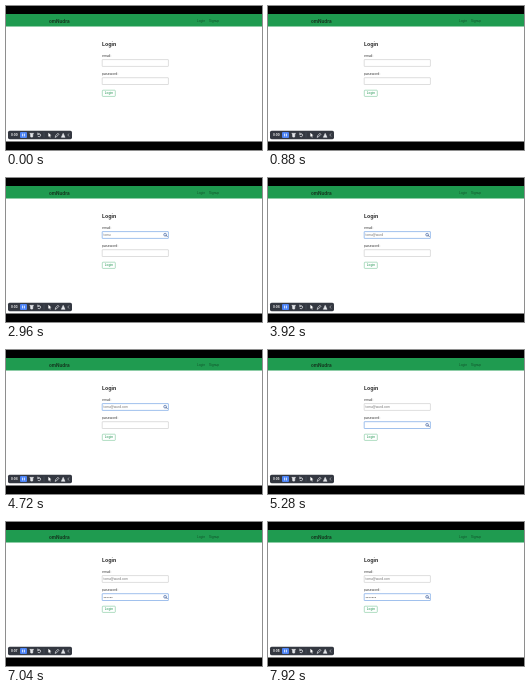
Recreate the animation shown at these times as an HTML page. Size 256 px wide and 144 px high, loop 8000 ms.

```html
<!DOCTYPE html>
<html lang="en">
<head>
<meta charset="utf-8">
<title>Login</title>
<style>
  html, body { margin: 0; width: 100%; height: 100%; overflow: hidden; background: #000; }
  svg { display: block; width: 100vw; height: 100vh; }
  text { font-family: Inter, sans-serif; font-size: 3.35px; fill: #3a3a3a; }
  .brand { font-size: 4.6px; font-weight: 700; fill: #14361f; }
  .nav { font-size: 3.1px; fill: #124f2a; }
  .title { font-size: 5.3px; font-weight: 700; fill: #2b2b2b; }
  .value { font-family: "Liberation Sans", Arial, sans-serif; font-size: 3.2px; fill: #707070; }
  .secret { font-size: 4px; letter-spacing: .15px; }
  .field rect { fill: #fff; stroke: #bdbdbd; stroke-width: .5; }
  .field .key { visibility: hidden; }
  .focus rect { stroke: #6f9fe4; stroke-width: .65; }
  .focus .key { visibility: visible; }
  .button { fill: #fff; stroke: #62ba87; stroke-width: .5; }
  .button-label { font-size: 3.1px; font-weight: 500; fill: #2b9a5a; }
  .clock { font-size: 2.8px; font-weight: 700; fill: #fff; }
  .line { fill: none; stroke: #e4e6ea; stroke-width: .7; stroke-linecap: round; stroke-linejoin: round; }
</style>
</head>
<body>
<svg viewBox="0 0 256 144" preserveAspectRatio="none">
  <defs>
    <g id="key">
      <circle cx="159.1" cy="56.7" r="1.4" fill="#dfe8f7" stroke="#5b78ad" stroke-width=".7"/>
      <path d="M159.9 57.2l1.5 1.6" stroke="#2c4270" stroke-width=".8"/>
    </g>
  </defs>

  <rect y="8" width="256" height="127.5" fill="#fff"/>
  <rect y="8" width="256" height="12.5" fill="#1f9b50"/>
  <text class="brand" x="43" y="16.7">omNudra</text>
  <text class="nav" x="191" y="16.2">Login</text>
  <text class="nav" x="203" y="16.2">Signup</text>

  <text class="title" x="96" y="40.4">Login</text>
  <text x="96" y="51">email:</text>
  <g class="field" id="email">
    <rect x="96.2" y="53.6" width="66.2" height="6.8" rx=".3"/>
    <text class="value" x="97.5" y="58.2"></text>
    <use class="key" href="#key"/>
  </g>
  <text x="96" y="69.2">password:</text>
  <g class="field" id="password">
    <rect x="96.2" y="71.7" width="66.2" height="6.8" rx=".3"/>
    <text class="value secret" x="97.5" y="76.5"></text>
    <use class="key" href="#key" y="18.1"/>
  </g>
  <rect class="button" x="96.3" y="84.2" width="13" height="6.2" rx=".7"/>
  <text class="button-label" x="98.8" y="88.4">Login</text>

  <rect x="2" y="124.8" width="64" height="8.4" rx="1.6" fill="#343841"/>
  <text class="clock" id="clock" x="5" y="130">0:00</text>
  <rect x="14" y="126" width="7" height="6" rx="1" fill="#4b82f5"/>
  <path d="M16.6 127.6v2.8M18.4 127.6v2.8" stroke="#fff" stroke-width=".8"/>
  <g class="line">
    <path d="M24 127.4h3.4M24.5 127.6l.3 3.4h1.8l.3-3.4" fill="#e4e6ea"/>
    <path d="M31.8 128.2a1.6 1.6 0 1 1 .2 2.2M31.8 127v1.4h1.3"/>
    <path d="M38 126.8v4.4" stroke="#596070" stroke-width=".4"/>
    <path d="M49.3 131l.4-1.4 2.2-2.3 1 1-2.2 2.3z"/>
    <path d="M55.6 131l1.6-3.6 1.6 3.6z" fill="#e4e6ea"/>
    <path d="M62.8 127.8l-1 1.2 1 1.2" stroke-width=".5"/>
  </g>
  <path d="M42.4 126.8l3 2.7-1.5.1.8 1.6-.8.3-.7-1.6-.9.9z" fill="#fff"/>

  <path id="pointer" d="M0 0l2 1.9-1 .1.5 1-.5.2-.4-1-.6.6z" fill="#444"/>
</svg>
<script>
  const LOOP = 8000, KEY_TIME = 160;
  const ADDRESS = "tomu@wunil.com", SECRET = "•".repeat(7);
  const find = s => document.querySelector(s);
  const clamp = (v, lo, hi) => Math.min(hi, Math.max(lo, v));
  const clock = find("#clock"), pointer = find("#pointer");

  const typed = (text, t, start, step) =>
    text.slice(0, clamp(Math.floor((t - start) / step) + 1, 0, text.length));

  function field(id) {
    const group = find(id), value = group.querySelector("text");
    return (text, focused) => {
      value.textContent = text;
      group.classList.toggle("focus", focused);
    };
  }
  const email = field("#email"), password = field("#password");

  function draw(t) {
    clock.textContent = "0:0" + Math.floor((t + 80) / 1000);
    email(typed(ADDRESS, t, 2400, KEY_TIME), t >= 1040 && t < 4880);
    password(typed(SECRET, t, 5760, 240), t >= 4880);

    // the pointer slides out past the right edge after the click
    const p = clamp((t - 1120) / 560, 0, 1), ease = p * p * (3 - 2 * p);
    pointer.setAttribute("transform", `translate(${160 + 93.6 * ease} ${57 - 16 * ease})`);
    pointer.style.visibility = t >= 1040 && t < 1760 ? "visible" : "hidden";
  }

  const start = performance.now();
  function tick() {
    draw((performance.now() - start) % LOOP);
    requestAnimationFrame(tick);
  }
  tick();
</script>
</body>
</html>
```
